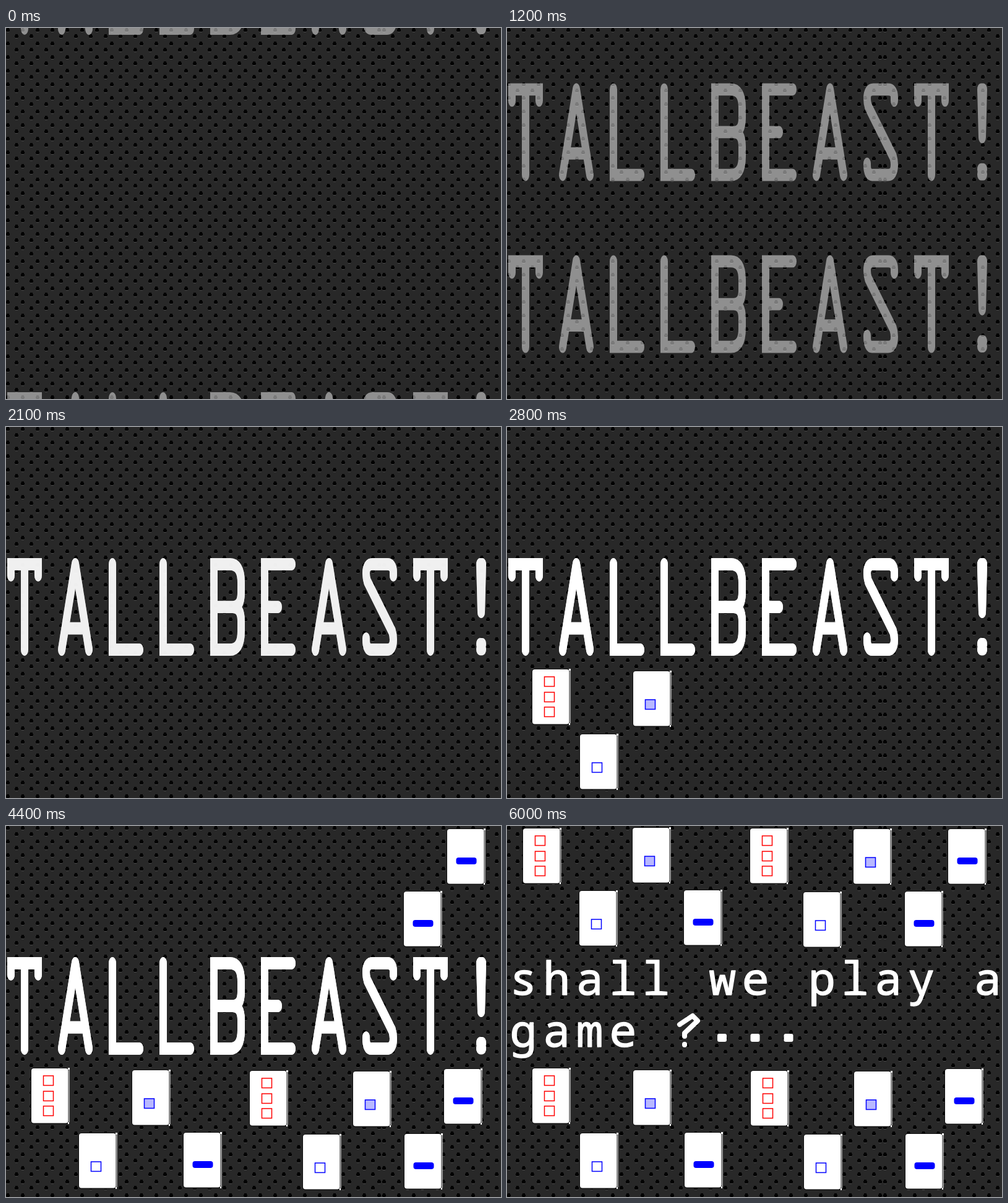
An HTML page with a canvas for the animation above (8000 ms loop, 800x600 px).

```html
<!DOCTYPE html>
<html lang="en">
<head>
<meta charset="utf-8">
<title>Tallbeast!</title>
<style>
  html, body { margin: 0; width: 100%; height: 100%; overflow: hidden; background: #282828; }
  canvas { display: block; }
</style>
</head>
<body>
<canvas width="800" height="600" role="img" aria-label="TALLBEAST! shall we play a game ?..."></canvas>
<script>
const ctx = document.querySelector('canvas').getContext('2d');
const LOOP = 8000;

// Letter strokes in a 56 x 96 cell, drawn 12 wide and stretched vertically.
const LETTERS = {
  T: 'M6 17V6H50V17M28 6V90',
  A: 'M6 90L28 6M28 6L50 90M12 69H44',
  L: 'M6 6V90H50',
  B: 'M6 48V6H32Q50 6 50 24V34Q50 48 36 48Q50 48 50 62V72Q50 90 32 90H6V48H36',
  E: 'M50 6H6V90H50M6 48H28',
  S: 'M50 17V14Q50 6 40 6H16Q6 6 6 15Q6 19 8 23L48 72Q50 76 50 80Q50 90 40 90H14Q6 90 6 80V79',
  '!': 'M26 6H30M26 6L28 53M30 6L28 53M26 84.5H30M26 89.5H30'
};
const title = new Path2D();
[...'TALLBEAST!'].forEach((c, i) =>
  title.addPath(new Path2D(LETTERS[c]), new DOMMatrix().translate(i * 82, 0)));

// Top edges of the two title copies: [step, y]
const FALLING = [[0, -147], [8, -9], [9, 2], [16, 206], [17, 212]];
const RISING = [[0, 589], [8, 472], [9, 437], [16, 275], [20, 212]];

// Cards in order of appearance: [x, y, kind]
const CARDS = [
  [40, 391, 'triple'], [117, 496, 'open'], [203, 394, 'tinted'], [286, 495, 'bar'],
  [393, 395, 'triple'], [479, 498, 'open'], [560, 396, 'tinted'], [643, 497, 'bar'],
  [707, 392, 'bar'], [712, 4, 'bar'], [642, 105, 'bar'], [559, 4, 'tinted'],
  [478, 106, 'open'], [392, 3, 'triple'], [285, 103, 'bar'], [202, 2, 'tinted'],
  [116, 104, 'open'], [25, 3, 'triple']
];

// Perforated sheet; the tile repeats after 608 px.
const holes = new Path2D(), glints = new Path2D();
function addHole(x, y) {
  holes.rect(x - 3, y - 1, 6, 3);
  holes.rect(x - 2, y - 3, 4, 6);
  glints.rect(x - 2, y + 3, 4, 1);
}
for (let tile = 0; tile < 800; tile += 608)
  for (let y = 3; y < 610; y += 22)
    for (let x = 3; x < 608; x += 24) {
      addHole(tile + x, y);
      if (x + 14 < 608) addHole(tile + x + 14, y + 10);
    }

function keyed(keys, step) {
  for (let i = 1; i < keys.length; i++) {
    const [s0, y0] = keys[i - 1], [s1, y1] = keys[i];
    if (step <= s1) return y0 + (y1 - y0) * (step - s0) / (s1 - s0);
  }
  return keys[keys.length - 1][1];
}

function roundBox(x, y, w, h, r, color) {
  ctx.fillStyle = color;
  ctx.beginPath();
  ctx.roundRect(x, y, w, h, r);
  ctx.fill();
}

function drawSheet() {
  ctx.fillStyle = '#282828';
  ctx.fillRect(0, 0, 800, 600);
  ctx.fillStyle = '#4a4a4a';
  ctx.fill(glints);
  ctx.fillStyle = '#000';
  ctx.fill(holes);
}

function drawTitle(top, alpha) {
  ctx.save();
  ctx.setTransform(1, 0, 0, 158 / 96, 2, top);
  ctx.globalAlpha = alpha;
  ctx.strokeStyle = '#fff';
  ctx.lineWidth = 12;
  ctx.lineCap = 'round';
  ctx.stroke(title);
  ctx.restore();
}

function drawSquare(x, y, color, fill) {
  if (fill) {
    ctx.fillStyle = fill;
    ctx.fillRect(x, y, 16, 16);
  }
  ctx.strokeStyle = color;
  ctx.lineWidth = 1.5;
  ctx.strokeRect(x, y, 16, 15.5);
}

function drawCard([x, y, kind]) {
  roundBox(x, y, 62, 91, 5, '#111');
  roundBox(x + 1, y + 1, 59.5, 88.5, 4, '#fff');
  ctx.fillRect(x + 60, y, 3, 3);
  ctx.fillRect(x + 60, y + 88, 2, 3);
  ctx.fillRect(x + 61.5, y + 3, 1, 85);
  if (kind === 'triple') for (const dy of [13, 38, 62]) drawSquare(x + 20.5, y + dy, '#f00');
  if (kind === 'open') drawSquare(x + 20.5, y + 47, '#00f');
  if (kind === 'tinted') drawSquare(x + 20.5, y + 47, '#00f', '#b8b8ff');
  if (kind === 'bar') roundBox(x + 15.5, y + 47, 33, 11, 4, '#00f');
}

function drawLine(text, baseline) {
  [...text].forEach((c, i) => {
    const x = 26.5 + i * 53.6;
    ctx.fillText(c, x, baseline);
    ctx.strokeText(c, x, baseline);
  });
}

function drawQuestion() {
  ctx.save();
  ctx.font = '73px "Noto Sans Mono", monospace';
  ctx.textAlign = 'center';
  ctx.fillStyle = ctx.strokeStyle = '#fff';
  ctx.lineWidth = 1.5;
  ctx.lineJoin = ctx.lineCap = 'round';
  drawLine('shall we play a', 273);
  drawLine('game', 357);
  ctx.lineWidth = 8;
  ctx.stroke(new Path2D('M279 321L300 307L308 315L287 335V340M287 353V354'));
  for (const x of [340, 393.5, 447.5]) roundBox(x, 336, 15, 13, 3, '#fff');
  ctx.restore();
}

function draw(now) {
  const time = now % LOOP, step = Math.floor(time / 100);
  drawSheet();
  if (step < 60) {
    const alpha = Math.min(1, Math.max(0.48, 0.48 + (step - 20) * 0.26));
    drawTitle(keyed(FALLING, step), alpha);
    drawTitle(keyed(RISING, step), alpha);
  } else {
    drawQuestion();
  }
  CARDS.slice(0, Math.max(0, Math.floor((step - 22) / 2))).forEach(drawCard);
}

const start = performance.now();
function tick() {
  draw(performance.now() - start);
  requestAnimationFrame(tick);
}
tick();
</script>
</body>
</html>
```
